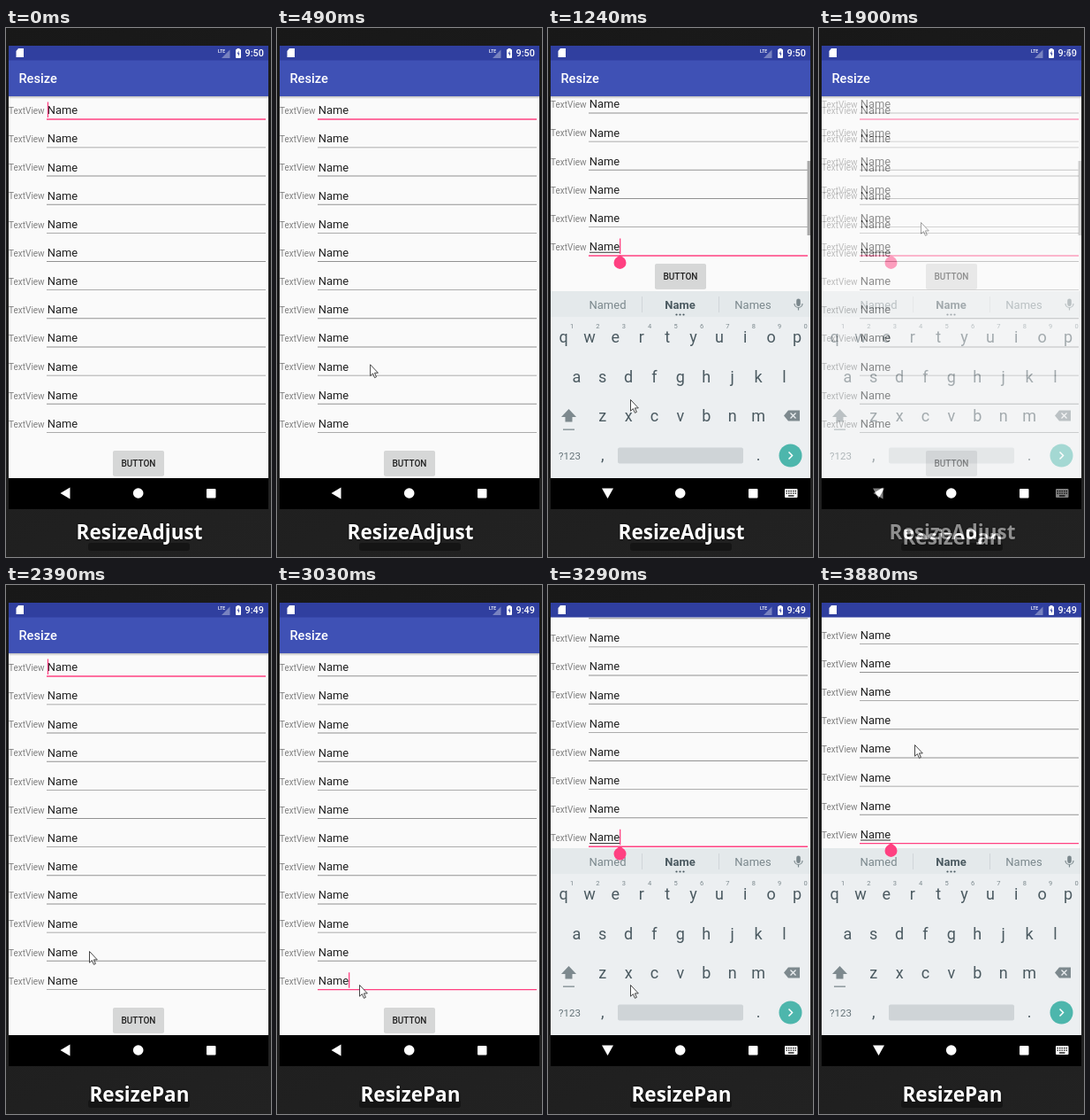
Animation, 300 px wide and 597 px high, one loop 3.92 s. Source, as an HTML page with a canvas:

```html
<!DOCTYPE html>
<html lang="en">
<head>
<meta charset="utf-8">
<title>Keyboard resize modes</title>
<style>
  html, body { margin: 0; width: 100%; height: 100%; overflow: hidden; background: #1c1c1c; }
  canvas { display: block; }
</style>
</head>
<body>
<canvas id="stage" width="300" height="597"></canvas>
<script>
const W = 300, H = 597, LOOP = 3920;
const PINK = '#ff4081', KEY = '#4b5a61', MUTED = '#7b888d';
const FADE_START = 1800, PAN_START = 2100;
const screenCtx = document.getElementById('stage').getContext('2d');
let ctx = screenCtx;

const clamp01 = v => Math.min(1, Math.max(0, v));
const progress = (t, start, length) => clamp01((t - start) / length);
const easeOut = u => 1 - (1 - u) * (1 - u);
const between = (t, a, b) => t >= a && t < b;
const stepped = (t, start) => start + Math.floor((t - start) / 42.5) * 42.5;
const rowY = i => 93 + 32.15 * i;

function rect(x, y, w, h, color, radius = 0) {
  ctx.fillStyle = color;
  ctx.beginPath();
  ctx.roundRect(x, y, w, h, radius);
  ctx.fill();
}

function circle(x, y, r, color) {
  ctx.fillStyle = color;
  ctx.beginPath();
  ctx.arc(x, y, r, 0, Math.PI * 2);
  ctx.fill();
}

function shape(path, fill, stroke, x = 0, y = 0, width = 1) {
  ctx.save();
  ctx.translate(x, y);
  const p = new Path2D(path);
  if (fill) { ctx.fillStyle = fill; ctx.fill(p); }
  if (stroke) { ctx.strokeStyle = stroke; ctx.lineWidth = width; ctx.stroke(p); }
  ctx.restore();
}

function text(str, x, y, size, color, align = 'left', weight = 400, family = 'Roboto') {
  ctx.font = `${weight} ${size}px ${family}, sans-serif`;
  ctx.textAlign = align;
  ctx.fillStyle = color;
  ctx.fillText(str, x, y);
}

function clipped(x, y, w, h, draw) {
  ctx.save();
  ctx.beginPath();
  ctx.rect(x, y, w, h);
  ctx.clip();
  draw();
  ctx.restore();
}

// Draws a group as one flat layer with a common opacity.
function layer(alpha, draw) {
  if (alpha <= 0) return;
  if (alpha >= 1) return draw();
  const outer = ctx, buffer = document.createElement('canvas');
  buffer.width = W;
  buffer.height = H;
  ctx = buffer.getContext('2d');
  draw();
  ctx = outer;
  ctx.globalAlpha = alpha;
  ctx.drawImage(buffer, 0, 0);
  ctx.globalAlpha = 1;
}

function backdrop() {
  const g = ctx.createLinearGradient(0, 0, W, H);
  g.addColorStop(0, '#181818');
  g.addColorStop(0.5, '#1d1d1d');
  g.addColorStop(1, '#222222');
  rect(0, 0, W, H, g);
  rect(3, 20, 294, 523, '#000');
}

function statusBar(clock) {
  rect(3, 20, 294, 16.5, '#303f9f');
  shape('M14 23H20V33H11.5V26Z', '#fff');
  text('LTE', 240, 28, 5, '#fff', 'left', 500);
  shape('M244 34H253.5V24.5Z', 'rgba(255,255,255,.35)');
  rect(260, 24, 6, 10, '#fff', 1);
  rect(261.5, 23, 3, 2, '#fff');
  shape('M263.6 25.5L261.7 29.3H263V32L264.5 28.4H263.4Z', '#303f9f');
  text(clock, 270.5, 32, 10.8, '#fff', 'left', 500);
}

function toolbar() {
  const g = ctx.createLinearGradient(0, 77, 0, 80);
  g.addColorStop(0, 'rgba(0,0,0,.25)');
  g.addColorStop(1, 'rgba(0,0,0,0)');
  rect(3, 77, 294, 3, g);
  rect(3, 36, 294, 41, '#3f51b5');
  text('Resize', 14.5, 62, 14.6, '#fff', 'left', 500);
}

function formRow(i, state) {
  const y = rowY(i), focused = i === state.focus;
  text('TextView', 3, y + 4, 10, '#808080');
  text('Name', 46.8, y + 4.2, 12.9, '#212121');
  rect(46, y + 9.3, 248, focused ? 1.4 : 0.9, focused ? PINK : '#929292');
  if (focused && state.composing) rect(47, y + 5.8, 34, 1, '#333');
  if (focused && state.caret) rect(state.caretX, y - 9.5, 1.3, 17.5, PINK);
}

function button(y) {
  rect(121, y - 13.2, 58, 28, 'rgba(0,0,0,.18)', 2);
  rect(121, y - 14, 58, 28, '#d6d7d7', 2);
  text('BUTTON', 150, y + 3.6, 10, '#212121', 'center', 500);
}

function form(state, listBottom, scroll, buttonY) {
  clipped(3, 77, 294, listBottom - 77, () => {
    ctx.translate(0, -scroll);
    for (let i = 0; i < 12; i++) formRow(i, state);
  });
  button(buttonY);
}

function handle(y) {
  shape('M0 -8.5L5 -4.5A7 7 0 1 1 -5 -4.5Z', PINK, null, 81.5, y);
}

function keyRow(keys, x, y, size = 18) {
  [...keys].forEach((key, i) => text(key, x + i * 29.4, y, size, KEY, 'center'));
}

function keyboard(suggestions) {
  rect(3, 297, 294, 211, '#eceff1');
  rect(3, 297, 294, 29, '#e4e9eb');
  rect(106, 303, 1, 18, '#d0d6d9');
  rect(193, 303, 1, 18, '#d0d6d9');
  if (suggestions) {
    text('Named', 67.5, 317, 13, MUTED, 'center');
    text('Name', 149.5, 317, 13, KEY, 'center', 700);
    text('Names', 232, 317, 13, MUTED, 'center');
    for (const x of [145.5, 149.5, 153.5]) circle(x, 323.5, 1.1, KEY);
  }
  rect(281.2, 305.5, 4.6, 8.5, MUTED, 2.3);
  shape('M279 311A4.5 4.5 0 0 0 288 311M283.5 315.5V318.5', null, MUTED, 0, 0, 1.2);

  keyRow('qwertyuiop', 17.5, 355);
  [...'1234567890'].forEach((n, i) => text(n, 27 + i * 29.4, 338.5, 7.5, MUTED, 'center'));
  keyRow('asdfghjkl', 32.3, 399.5);
  keyRow('zxcvbnm', 61.7, 444);
  shape('M23.5 430L32 439H27.5V444.5H19.5V439H15Z', '#7d898e');
  rect(17, 452.5, 13, 1.3, '#7d898e');
  shape('M267 437.5L272 431.5H285V443.5H272Z', '#7d898e');
  shape('M274.5 434.5L280.5 440.5M280.5 434.5L274.5 440.5', null, '#eceff1', 0, 0, 1.3);

  text('?123', 24.5, 486.5, 11.5, '#66747a', 'center');
  text(',', 61.7, 488, 18, KEY, 'center');
  rect(79, 473.5, 142, 18, '#cfd4d7', 2);
  text('.', 238, 488, 18, KEY, 'center');
  circle(274.5, 482.5, 13, '#4db6ac');
  shape('M272.5 478.5L276.5 482.5L272.5 486.5', null, '#fff', 0, 0, 1.5);
}

function slidingKeyboard(k, suggestions) {
  layer(k, () => clipped(3, 20, 294, 523, () => {
    ctx.translate(0, 75 * (1 - k));
    keyboard(suggestions);
  }));
}

function navIcons(open) {
  shape(open ? 'M61 519.5H74L67.5 531Z' : 'M61.5 525L72.5 518.5V531.5Z', '#fff');
  circle(149.7, 525, 5.8, '#fff');
  rect(227, 520, 10.5, 10.5, '#fff', 1);
  if (!open) return;
  rect(268, 520, 14.5, 10, '#fff', 1);
  for (let i = 0; i < 5; i++) {
    rect(269.5 + i * 2.5, 522, 1.4, 1.3, '#000');
    rect(269.5 + i * 2.5, 524.5, 1.4, 1.3, '#000');
  }
  rect(272, 527.3, 6.5, 1.3, '#000');
}

function caption(str, y) {
  rect(93, 581, 115, 9, '#151515', 3);
  ctx.save();
  ctx.shadowColor = '#000';
  ctx.shadowBlur = 3;
  text(str, 151, y, 22.5, '#fff', 'center', 700, "'Open Sans'");
  ctx.restore();
}

// Stops are [time, x, y]; the pointer is absent before the first one.
function pointer(t, stops) {
  if (t < stops[0][0]) return;
  let i = stops.length - 1;
  while (t < stops[i][0]) i--;
  const [t0, x0, y0] = stops[i], [t1, x1, y1] = stops[i + 1] || [t0 + 1, x0, y0];
  const u = easeOut(progress(t, t0, t1 - t0));
  shape('M.5 .5V13.2L3.4 10.6L5.4 15.3L7.4 14.4L5.4 9.9H9.3Z', '#fff', '#333',
    x0 + (x1 - x0) * u, y0 + (y1 - y0) * u, 0.9);
}

function adjustScene(t) {
  const clicked = t >= 1010, open = t >= 1095;
  const k = progress(stepped(t, 1010), 1070, 150);
  const state = {
    focus: clicked ? 10 : 0,
    caretX: clicked ? 81 : 46.8,
    caret: clicked ? t < 1520 : !between(t, 280, 780),
    composing: k === 1
  };
  backdrop();
  rect(3, 36, 294, (open ? 297 : 508) - 36, '#fafafa');
  form(state, open ? 264 : 508, open ? 167.5 : 0, open ? 280 : 491);
  if (open) rect(293.5, 150, 3.5, 84, '#a9a9a9');
  toolbar();
  statusBar('9:50');
  if (open) slidingKeyboard(k, k === 1);
  if (open) handle(264.5);
  navIcons(open);
  caption('ResizeAdjust', 577);
  pointer(t, [[180, 207, 46], [640, 93, 419], [1430, 93, 419], [1790, 115, 219]]);
}

function panScene(t) {
  const clicked = t >= 3030, open = t >= 3115;
  const s = stepped(t, 3030);
  const k = progress(s, 3110, 158);
  const shift = 165 * easeOut(progress(s, 3110, 205));
  const state = {
    focus: clicked ? 11 : 0,
    caretX: clicked ? 81 : 46.8,
    caret: clicked ? t < 3600 : between(t, 2120, 2530),
    composing: k === 1
  };
  backdrop();
  clipped(3, 20, 294, 488, () => {
    ctx.translate(0, -shift);
    rect(3, 36, 294, 472, '#fafafa');
    form(state, 508, 0, 491);
    toolbar();
  });
  statusBar('9:49');
  if (open) {
    slidingKeyboard(k, k === 1);
    handle(464.5 - (k === 1 ? shift : 0));
  }
  navIcons(open);
  caption('ResizePan', 583);
  pointer(t, [[2140, 207, 46], [2390, 94, 413], [2600, 95, 455], [2720, 95, 455],
    [2850, 93, 451], [3440, 93, 451], [3870, 108, 180]]);
}

function render(t) {
  const mix = t < FADE_START ? 0 : Math.min(1, (Math.floor((t - FADE_START) / 100) + 1) / 4);
  if (mix < 1) adjustScene(t);
  layer(mix, () => panScene(Math.max(t, PAN_START)));
}

let start;
function tick(now) {
  start ??= now;
  render((now - start) % LOOP);
  requestAnimationFrame(tick);
}
requestAnimationFrame(tick);
</script>
</body>
</html>
```
